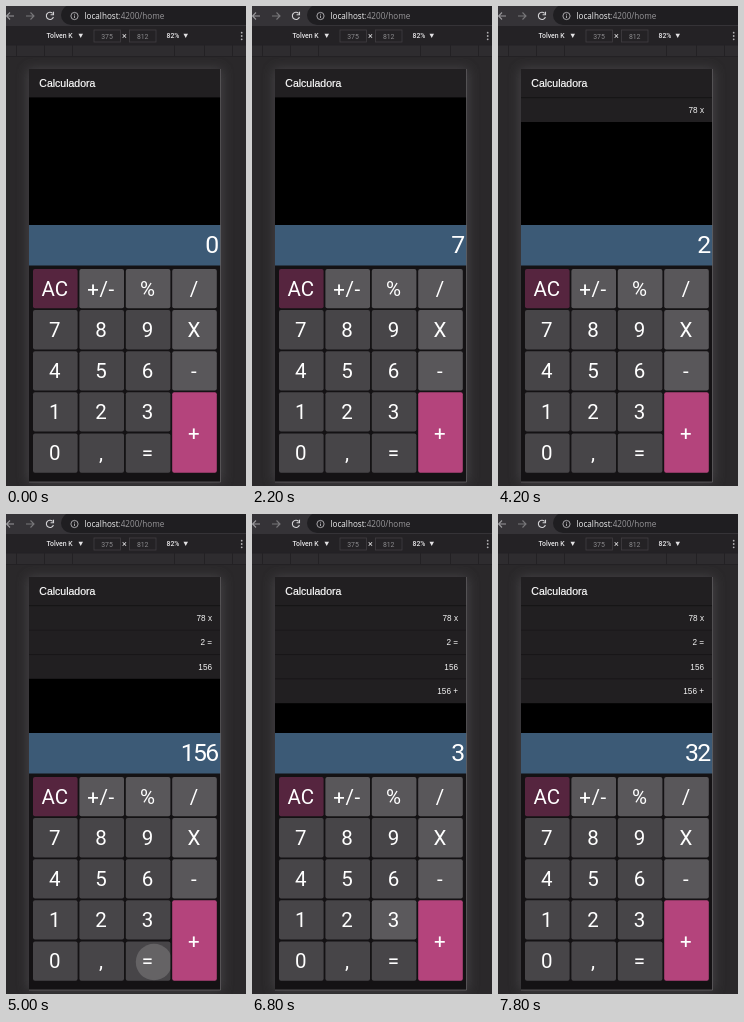
Recreate the animation shown at these times as an HTML page. Size 240x480 px, loop 8 s.

```html
<!DOCTYPE html>
<html lang="es">
<head>
<meta charset="utf-8">
<title>Calculadora</title>
<style>
  html, body { margin: 0; width: 100%; height: 100%; overflow: hidden; background: #2a282a; }
  svg { display: block; width: 100%; height: 100%; }
  .url { font: 8.15px "Open Sans", sans-serif; }
  .tool { font: 6.9px Roboto, sans-serif; fill: #e4e3e5; }
  .title { font: 10.5px "Liberation Sans", sans-serif; fill: #fff; stroke: #fff; stroke-width: .2; }
  .row { font: 8.2px "Liberation Sans", sans-serif; fill: #f4f4f4; text-anchor: end; }
  .key { font: 20.5px Roboto, sans-serif; fill: #fff; text-anchor: middle; }
  .value { font: 24.8px Roboto, sans-serif; letter-spacing: -1.7px; fill: #fff; text-anchor: end; }
</style>
</head>
<body>
<svg viewBox="0 0 240 480" preserveAspectRatio="none">
  <defs>
    <filter id="glow" x="-20%" y="-10%" width="140%" height="120%"><feGaussianBlur stdDeviation="6"/></filter>
    <clipPath id="clip"><rect id="clipBox" rx="2"/></clipPath>
    <clipPath id="page"><rect y="51" width="240" height="429"/></clipPath>
  </defs>

  <rect width="240" height="480" fill="#2a282a"/>
  <rect width="240" height="20" fill="#353337"/>
  <rect x="55" y="-1" width="200" height="20" rx="10" fill="#1f1e21"/>
  <g fill="none" stroke-width="1.1">
    <path d="M8 10H0.5M4 6.5L.5 10L4 13.5" stroke="#99989b"/>
    <path d="M20 10H28M24.5 6.5L28 10L24.5 13.5" stroke="#79787b"/>
    <path d="M46.6 7.4A3.6 3.6 0 1 0 47.4 11M47.5 5.8V8.7H44.6" stroke="#d4d3d6"/>
    <circle cx="68.5" cy="10" r="3.6" stroke="#b5b4b7" stroke-width=".9"/>
    <path d="M68.5 9.5V12M68.5 7.8V8.7" stroke="#b5b4b7" stroke-width=".9"/>
  </g>
  <text class="url" x="78.5" y="13" fill="#f1f1f2">localhost<tspan fill="#99989b">:4200/home</tspan></text>

  <rect y="20" width="240" height="19" fill="#242225"/>
  <g class="tool">
    <text x="40.5" y="32.4" font-weight="500">Tolven K</text>
    <path d="M72.5 27.7H77L74.7 32Z"/>
    <text x="160.5" y="32.4" font-weight="500">82%</text>
    <path d="M177.5 27.7H182L179.7 32Z"/>
    <text x="116" y="33" font-size="9">×</text>
    <g fill="none" stroke="#403e41" stroke-width=".8">
      <rect x="88" y="24" width="26.5" height="12"/>
      <rect x="123.5" y="24" width="26.5" height="12"/>
    </g>
    <g fill="#89888b" text-anchor="middle">
      <text x="101" y="32.5">375</text>
      <text x="136.7" y="32.5">812</text>
    </g>
    <g fill="#b0afb2">
      <circle cx="235.7" cy="26.7" r=".9"/><circle cx="235.7" cy="30" r=".9"/><circle cx="235.7" cy="33.3" r=".9"/>
    </g>
  </g>
  <rect y="39" width="240" height="12" fill="#2e2c2f"/>
  <path d="M0 39H240M0 50.5H240M10.5 39V50M38.5 39V50M66.5 39V50M168.5 39V50M198.5 39V50M226.5 39V50" stroke="#232124" stroke-width="1"/>

  <g clip-path="url(#page)"><rect x="22" y="63" width="194" height="413" fill="#59575a" opacity=".6" filter="url(#glow)"/></g>
  <rect x="23" y="63" width="191.5" height="413" fill="#141214"/>
  <rect x="23" y="63" width="191.5" height="28.5" fill="#211f21"/>
  <text class="title" x="33.3" y="81">Calculadora</text>
  <rect x="23" y="91.5" width="191.5" height="127.5" fill="#000"/>
  <g id="history"></g>
  <rect x="23" y="219" width="191.5" height="40.5" fill="#3c5a76"/>
  <text id="value" class="value" x="211.5" y="247.3"></text>
  <g id="keys"></g>
  <g clip-path="url(#clip)"><circle id="ripple" fill="#fff"/></g>
  <g id="labels"></g>
  <path d="M214.5 63V476H23" fill="none" stroke="#6a686b" stroke-width=".7"/>
</svg>
<script>
const LOOP = 8000, STEP = 200, GROW = 225, FADE = 200;
const $ = id => document.getElementById(id);

function add(parent, tag, attrs, text) {
  const el = document.createElementNS("http://www.w3.org/2000/svg", tag);
  set(el, attrs);
  if (text) el.textContent = text;
  parent.appendChild(el);
  return el;
}

function set(el, attrs) {
  for (const name in attrs) el.setAttribute(name, attrs[name]);
}

// Keypad
const keys = {};
const layout = [["AC", "+/-", "%", "/"], ["7", "8", "9", "X"], ["4", "5", "6", "-"], ["1", "2", "3", "+"], ["0", ",", "="]];

function keyColor(label, row, col) {
  if (label === "AC") return "#56253f";
  if (label === "+") return "#b4447c";
  return row === 0 || col === 3 ? "#59575a" : "#474548";
}

layout.forEach((labels, row) => labels.forEach((label, col) => {
  const box = {
    x: 27 + col * 46.4, y: 263 + row * 41.1,
    width: 44.6, height: label === "+" ? 80.4 : 39.3
  };
  keys[label] = box;
  add($("keys"), "rect", { ...box, rx: 2, fill: keyColor(label, row, col) });
  add($("labels"), "text", {
    class: "key",
    x: box.x + box.width / 2 - .6,
    y: box.y + box.height / 2 + 7.3,
    "letter-spacing": label === "+/-" ? .6 : 0
  }, label);
}));

// Log rows, revealed as operations come in
const rows = ["78 x", "2 =", "156", "156 +"].map((text, i) => {
  const y = 91.5 + i * 24.4;
  const g = add($("history"), "g", {});
  add(g, "rect", { x: 23, y, width: 191.5, height: 24.5, fill: "#211f21" });
  add(g, "path", { d: `M23 ${y + .3}H214.5`, stroke: "#181618", "stroke-width": .7 });
  add(g, "text", { class: "row", x: 206, y: y + 15.2 }, text);
  return g;
});

const presses = [
  { at: 1770, key: "7", value: "7", log: 0, x: 48, y: 325 },
  { at: 2570, key: "8", value: "78", log: 0, x: 96, y: 325 },
  { at: 3161, key: "X", value: "0", log: 1, x: 188, y: 328 },
  { at: 3770, key: "2", value: "2", log: 1, x: 97, y: 407 },
  { at: 4951, key: "=", value: "156", log: 3, x: 148, y: 448 },
  { at: 5924, key: "+", value: "156", log: 4, x: 192, y: 441 },
  { at: 6510, key: "3", value: "3", log: 4, x: 143, y: 407 },
  { at: 7330, key: "2", value: "32", log: 4, x: 97, y: 407 }
];
const idle = { at: -LOOP, key: "AC", value: "0", log: 0, x: 0, y: 0 };

function drawRipple(press, age) {
  const box = keys[press.key];
  const reach = Math.hypot(
    Math.max(press.x - box.x, box.x + box.width - press.x),
    Math.max(press.y - box.y, box.y + box.height - press.y)
  );
  const grow = 1 - (1 - Math.min(1, age / GROW)) ** 3;
  const fade = Math.max(0, 1 - Math.max(0, age - GROW) / FADE);
  set($("clipBox"), box);
  set($("ripple"), { cx: press.x, cy: press.y, r: reach * grow, opacity: .16 * fade });
}

function render(time) {
  const t = Math.floor((time % LOOP) / STEP) * STEP;
  const press = presses.filter(p => p.at <= t).pop() || idle;
  $("value").textContent = press.value;
  rows.forEach((row, i) => set(row, { visibility: i < press.log ? "visible" : "hidden" }));
  drawRipple(press, t - press.at);
}

let start;
function tick(now) {
  start ??= now;
  render(now - start);
  requestAnimationFrame(tick);
}
render(0);
requestAnimationFrame(tick);
</script>
</body>
</html>
```
